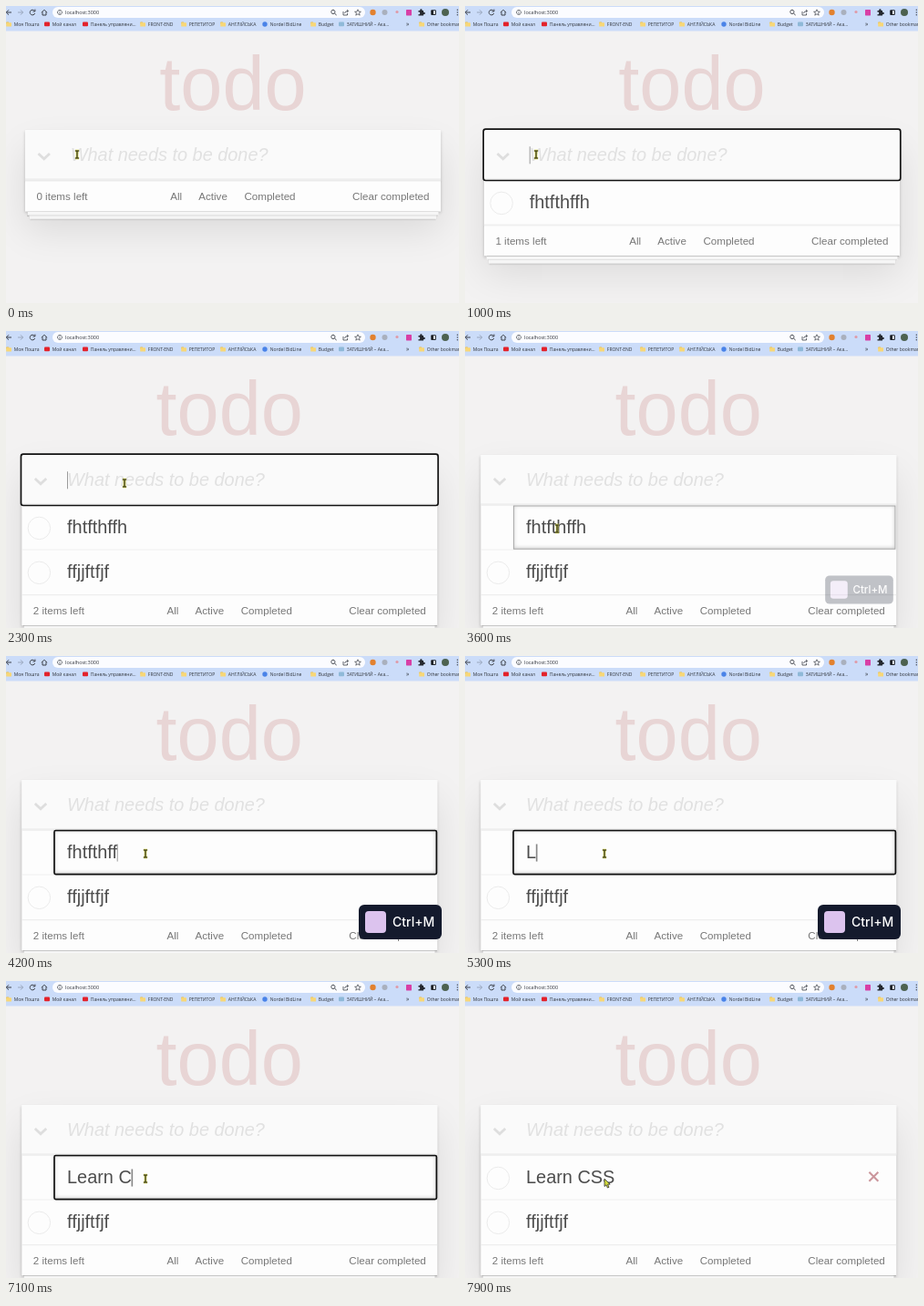
These frames come from a looping animation (497x326 px, 8 s). An HTML page:

```html
<!DOCTYPE html>
<html lang="en">
<head>
<meta charset="utf-8">
<title>Todo list</title>
<style>
  html, body { margin: 0; width: 100%; height: 100%; overflow: hidden; }
  * { box-sizing: border-box; }
  #stage {
    position: relative; width: 497px; height: 326px; overflow: hidden;
    background: #f3f2f2; white-space: nowrap; font-variant-ligatures: none;
    font-family: "Liberation Sans", Arial, sans-serif;
  }
  #stage > * { position: absolute; }
  #bar, #pointer { left: 0; top: 0; }
  #bar { font-family: "Open Sans", "Noto Sans", sans-serif; fill: #30343a; }
  #bar .line { fill: none; stroke: #3d4148; stroke-width: 1; }

  /* The page is laid out at its natural size and scaled down. */
  #page { left: 0; top: 0; width: 550px; transform-origin: 0 0; }
  h1 {
    position: absolute; left: 0; width: 550px; top: -118.7px; margin: 0; text-align: center;
    font-size: 100px; line-height: 115px; font-weight: 400; color: rgba(175, 47, 47, .15);
  }
  #card {
    position: relative; background: #fdfdfd;
    box-shadow: 0 2px 4px rgba(0,0,0,.2), 0 25px 50px rgba(0,0,0,.1);
  }
  .field { font-size: 24px; color: #4d4d4d; }
  #new {
    position: relative; height: 65.6px; padding: 16px 16px 16px 60px; line-height: 33.6px;
    background: #fafafa; box-shadow: inset 0 -2px 1px rgba(0,0,0,.04);
  }
  .focus { outline: 2.3px solid #111; border-radius: 2px; z-index: 3; }
  .hint { font-style: italic; color: #e1e1e1; position: absolute; left: 60px; top: 16px; }
  #newText, #editText { white-space: pre; }
  .caret { display: inline-block; width: 1.2px; height: 23px; margin-right: -1.2px; vertical-align: -4px; background: #888; }
  #card svg { position: absolute; overflow: visible; fill: none; width: 1px; height: 1px; }
  #list { position: relative; z-index: 2; border-top: 1px solid #e6e6e6; }
  .row { position: relative; height: 59.8px; border-bottom: 1px solid #ededed; }
  .row:last-child { height: 58.8px; border: 0; }
  .label { position: absolute; left: 60px; top: 15px; line-height: 28.8px; }
  #edit {
    position: absolute; left: 43px; top: 0; width: 506px; height: 58.8px; padding: 14px 16px;
    line-height: 28.8px; background: #fdfdfd; border: 1px solid #999;
    box-shadow: inset 0 -1px 5px rgba(0,0,0,.2);
  }
  #edit.focus { outline-offset: -1px; }
  #foot { position: relative; height: 41px; border-top: 1px solid #e6e6e6; font-size: 14px; line-height: 20px; color: #777; }
  #foot span { position: absolute; top: 10px; }
  #foot::before {
    content: ""; position: absolute; left: 0; right: 0; bottom: 0; height: 41px;
    box-shadow: 0 1px 1px rgba(0,0,0,.2), 0 8px 0 -3px #f6f6f6, 0 9px 1px -3px rgba(0,0,0,.2),
      0 16px 0 -6px #f6f6f6, 0 17px 2px -6px rgba(0,0,0,.2);
  }
  #tips {
    display: flex; gap: 8px; height: 17px; padding: 0 4px; line-height: 16px; font-size: 5.4px;
    font-family: "Open Sans", "Noto Sans", sans-serif; color: #222;
    background: #f3f3f3; border: .6px solid #d2d2d2; box-shadow: 0 1px 2px rgba(0,0,0,.15);
  }
  #keys { left: 387px; top: 273px; width: 91px; height: 38px; border-radius: 6px; background: #141a2d; color: #fff; }
  #keys i { position: absolute; left: 7px; top: 7px; width: 23px; height: 24px; border-radius: 4px; background: #dcc3ee; }
  #keys b { position: absolute; left: 37px; top: 0; font: 500 14px/38px Inter, sans-serif; }
</style>
</head>
<body>
<div id="stage">
  <svg id="bar" width="497" height="28"></svg>
  <div id="page">
    <h1>todo</h1>
    <div id="card">
      <div id="new" class="field">
        <svg style="left:24.5px;top:34.5px"><path d="M-7.5-3.6 0 3.4 7.5-3.6" stroke="#dedede" stroke-width="3.4"/></svg>
        <span id="hint" class="hint">What needs to be done?</span><span id="newText"></span><span id="newCaret" class="caret"></span>
      </div>
      <div id="list"></div>
      <div id="foot">
        <span id="count" style="left:15px"></span>
        <span style="left:192px">All</span>
        <span style="left:229.5px">Active</span>
        <span style="left:290px">Completed</span>
        <span style="right:15px">Clear completed</span>
      </div>
    </div>
  </div>
  <div id="tips"></div>
  <div id="keys"><i></i><b>Ctrl+M</b></div>
  <svg id="pointer" width="497" height="326">
    <g id="beam" fill="none">
      <path d="M-2-4H2M0-4V4M-2 4H2" stroke="#d9d94a" stroke-width="2.6"/>
      <path d="M-2.2-4H2.2M0-4V4M-2.2 4H2.2" stroke="#222" stroke-width="1.1"/>
    </g>
    <path id="arrow" d="M0 0V8.5L2 6.8 3.4 10 5 9.3 3.6 6.2H6.2Z" fill="#cfd83c" stroke="#333" stroke-width=".8"/>
  </svg>
</div>
<script>
const LOOP = 8000, SCALE = .829;
const $ = id => document.getElementById(id);
const show = (el, on) => { el.style.display = on ? "" : "none"; };
const clamp = v => Math.max(0, Math.min(1, v));

function buildBar() {
  const dot = (x, y, r, c) => `<circle cx="${x}" cy="${y}" r="${r}" fill="${c}"/>`;
  const box = (x, y, w, h, c, r = .6) => `<rect x="${x}" y="${y}" width="${w}" height="${h}" rx="${r}" fill="${c}"/>`;
  const line = (d, extra = "") => `<path class="line" d="${d}" ${extra}/>`;
  const text = (x, y, size, s) => `<text x="${x}" y="${y}" font-size="${size}">${s}</text>`;
  const folder = x => box(x - 2.8, 17.6, 3, 2, "#e8bd4c") + box(x - 2.8, 18.3, 5.8, 4.2, "#f7d778");
  const badge = c => x => box(x - 3, 17.6, 6, 4.6, c, 1);
  const round = c => x => dot(x, 20, 2.7, c);
  const red = badge("#e3232c");
  const marks = [
    [3, folder, "Моя Пошта"], [45, red, "Мой канал"], [87, red, "Панель управлени..."],
    [150, folder, "FRONT-END"], [195, folder, "РЕПЕТИТОР"], [238, folder, "АНГЛІЙСЬКА"],
    [284, round("#4a83e8"), "Nordel BidLine"], [337, folder, "Budget"],
    [368, badge("#8fb9d8"), "ЗАТИШНИЙ – Ака..."], [456, folder, "Other bookmarks"]
  ];
  $("bar").innerHTML =
    box(0, 0, 497, 27.5, "#cbdcf9", 0) + box(51, 1, 343, 12, "#fbfcff", 6) +
    line("M6 7H.5M3 4.3.3 7 3 9.7") +
    line("M13 7H18.5M16 4.3 18.7 7 16 9.7", 'style="stroke:#9aa7bd"') +
    line("M31.3 5.4A2.8 2.8 0 1 0 31.7 8M31.9 3.6V6H29.5") +
    line("M39 7.2 42 4.2 45 7.2M40 6.5V10H44V6.5") +
    line("M61.5 7A2.5 2.5 0 1 1 61.5 6.9M59 6.6V8.6M59 5.2V5.9", 'style="stroke-width:.7"') +
    text(65, 9, 5.5, "localhost:3000") +
    line("M361 6.5A2.1 2.1 0 1 1 361 6.4M360.4 8 362.6 10") +
    line("M370 6V10H374.5V8M371.5 8Q372 5.5 375.5 5.5M374 4 375.6 5.5 374 7", 'style="stroke-width:.8"') +
    line("M386 3.8 387 6.2 389.4 6.3 387.5 7.8 388.2 10.2 386 8.8 383.8 10.2 384.5 7.8 382.6 6.3 385 6.2Z", 'style="stroke-width:.7"') +
    dot(402.5, 7, 3.2, "#e2812f") + dot(415.5, 7, 3, "#a9b0bd") + dot(429, 6.5, 1.6, "#df9aa8") +
    box(439, 4, 6, 6.4, "#d83fa6") +
    `<path d="M452.5 5H454.3A1.2 1.2 0 1 1 456.5 5H458V7A1.2 1.2 0 1 1 458 9V10.4H452.5V9A1.2 1.2 0 1 0 452.5 6.8Z" fill="#25282e"/>` +
    box(466.2, 4.2, 5.6, 5.8, "#1e2126", 1) + box(469, 5.2, 1.8, 3.8, "#eef3fc", 0) +
    dot(482, 7, 4, "#4d6250") +
    [4.2, 7, 9.8].map(y => dot(495.3, y, .7, "#3d4148")).join("") +
    marks.map(([x, icon, s]) => icon(x) + text(x + 5.8, 21.8, 5, s)).join("") +
    text(439, 21.9, 6.5, "»");
}

function buildRows() {
  const ring = `<svg style="left:23px;top:30px"><circle r="14.8" stroke="#ebebeb" stroke-width="1.2"/></svg>`;
  const cross = `<svg id="cross" style="left:520px;top:28.5px"><path d="M-6-6 6 6M6-6-6 6" stroke="#cb969c" stroke-width="2.5"/></svg>`;
  const edit = `<div id="edit" class="field"><span id="editText"></span><span id="editCaret" class="caret"></span></div>`;
  $("list").innerHTML =
    `<div class="row field" id="row1"><div id="view">${ring}<span class="label" id="label1"></span>${cross}</div>${edit}</div>` +
    `<div class="row field" id="row2">${ring}<span class="label">${SECOND}</span></div>`;
}

const FIRST = "fhtfthffh", SECOND = "ffjjftfjf", RENAMED = "Learn CSS";
const ADD1 = 1000, ADD2 = 2200, EDIT = 3400, EDIT_FOCUS = 3900, SAVE = 7700;

const typed = (word, start, step) => [...word].map((_, i) => [start + i * step, word.slice(0, i + 1)]);

const newKeys = [
  [100, ""], ...typed(FIRST, 200, 80), [ADD1, ""],
  ...typed("ffjjf", 1500, 100), [2000, "ffjjft"], [2060, "ffjjftf"], [2100, "ffjjftfj"], [2150, SECOND], [ADD2, ""]
];
const editKeys = [
  [EDIT, FIRST], [4200, FIRST.slice(0, 8)],
  ...[6, 4, 2, 0].map((n, i) => [4500 + i * 100, FIRST.slice(0, n)]),
  ...[5000, 5600, 5800, 6000, 6300, 6700, 7100, 7200, 7300].map((t, i) => [t, RENAMED.slice(0, i + 1)])
];
// start, end, left, top, words
const tips = [
  [1700, 1900, 85, 136, ["if", "of", "fifi"]],
  [6300, 6700, 118, 188, ["Learning", "Learned", "Learner"]]
];
// time, x, y
const path = [
  [0, 78, 163], [1000, 78, 163], [1700, 124, 165], [2000, 124, 165], [2300, 130, 167],
  [2700, 130, 167], [3100, 101, 217], [3600, 101, 217], [3900, 153, 217], [LOOP, 153, 217]
];

const latest = (list, t) => list.filter(k => k[0] <= t).pop();
const blink = (key, t) => !!key && (t - key[0]) % 1000 < 500;

function pointerAt(t) {
  const i = Math.max(1, path.findIndex(p => p[0] > t));
  const [a, b] = [path[i - 1], path[i]];
  const p = clamp((t - a[0]) / (b[0] - a[0]));
  const e = p * p * (3 - 2 * p);
  return [a[1] + (b[1] - a[1]) * e, a[2] + (b[2] - a[2]) * e];
}

function drawPage(t, y) {
  const items = (t >= ADD1) + (t >= ADD2);
  const editing = t >= EDIT && t < SAVE;
  const newFocus = t >= 100 && t < EDIT;
  const editFocus = editing && t >= EDIT_FOCUS;
  const newKey = latest(newKeys, t), editKey = latest(editKeys, t);
  const entry = newKey ? newKey[1] : "";

  $("page").style.transform = `translate(${items > 1 ? 17.3 : 21}px,136px) scale(${SCALE})`;
  $("new").classList.toggle("focus", newFocus);
  $("newText").textContent = entry;
  show($("hint"), !entry);
  show($("newCaret"), newFocus && blink(newKey, t));

  show($("row1"), items > 0);
  show($("row2"), items > 1);
  show($("view"), !editing);
  show($("cross"), y > 191);
  $("label1").textContent = t < SAVE ? FIRST : RENAMED;
  show($("edit"), editing);
  $("edit").classList.toggle("focus", editFocus);
  $("editText").textContent = editKey ? editKey[1] : "";
  show($("editCaret"), editFocus && blink(editKey, t));
  $("count").textContent = items + " items left";
  return editing;
}

function drawTips(t) {
  const tip = tips.find(k => t >= k[0] && t < k[1]);
  show($("tips"), tip);
  if (!tip) return;
  $("tips").style.left = tip[2] + "px";
  $("tips").style.top = tip[3] + "px";
  $("tips").innerHTML = tip[4].map(w => `<span>${w}</span>`).join("");
}

function drawKeys(t) {
  const p = Math.min(clamp((t - 3525) / 300), clamp((6900 - t) / 250));
  $("keys").style.opacity = p;
  $("keys").style.transform = `translateY(${-10.7 * (1 - p)}px) scale(${.76 + .24 * p})`;
}

function draw(t) {
  const [x, y] = pointerAt(t);
  const editing = drawPage(t, y);
  drawTips(t);
  drawKeys(t);
  const arrow = y > 191 && !editing;
  show($("arrow"), arrow);
  show($("beam"), !arrow);
  for (const id of ["arrow", "beam"]) $(id).setAttribute("transform", `translate(${x} ${y})`);
}

buildBar();
buildRows();
const start = performance.now();
function tick() {
  draw((performance.now() - start) % LOOP);
  requestAnimationFrame(tick);
}
tick();
</script>
</body>
</html>
```
